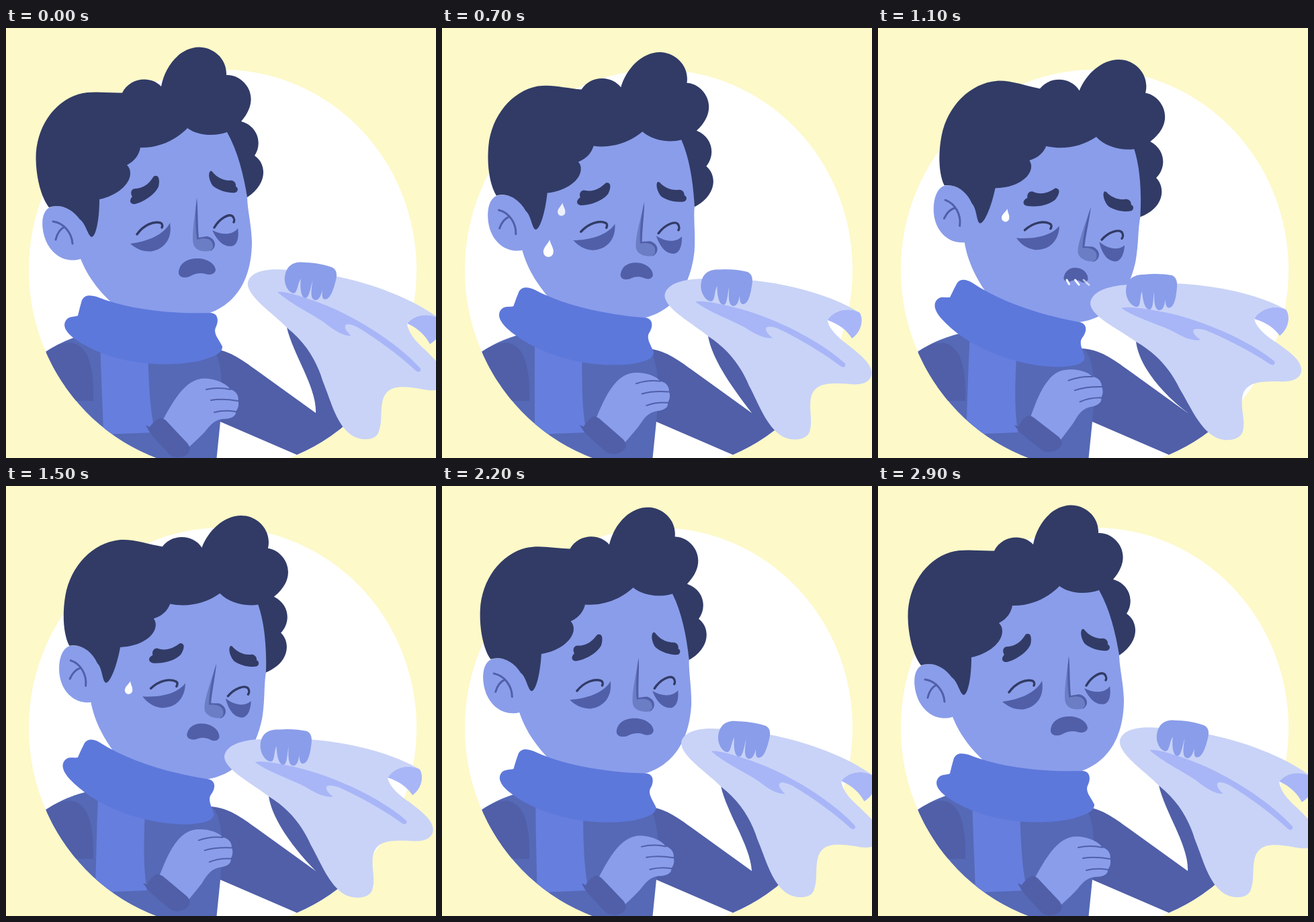
An HTML page that plays this animation: 640 px wide and 640 px high, repeating every 3 s.

```html
<!DOCTYPE html>
<html lang="en">
<head>
<meta charset="utf-8">
<title>Sneeze</title>
<style>
  html, body { margin: 0; width: 100%; height: 100%; overflow: hidden; background: #fdf9c9; }
  svg { display: block; width: 100%; height: 100%; }
  .skin { fill: #8a9dea; }
  .dark { fill: #505fa8; }
  .hair { fill: #313b66; }
  .fold { fill: #a8b6f8; }
  .line { fill: none; stroke: #505fa8; stroke-linecap: round; }
  .lid { fill: none; stroke: #313b66; stroke-width: 3.4; stroke-linecap: round; }
  .white { fill: #fff; }
  #spit path { fill: none; stroke: #fff; stroke-width: 3; stroke-linecap: round; }
</style>
</head>
<body>
<svg viewBox="0 0 640 640">
  <defs>
    <clipPath id="disc"><ellipse cx="322.5" cy="360" rx="288.5" ry="298"/></clipPath>
    <path id="drop" d="M0,-10 C2,-4 6,-1 6,4.5 A6,6 0 0 1 -6,4.5 C-6,-1 -2,-4 0,-10Z"/>
  </defs>
  <ellipse class="white" cx="322.5" cy="360" rx="288.5" ry="298"/>

  <g clip-path="url(#disc)">
    <path class="dark" d="M304,477 C332,479 350,493 375,511 L461,573 L475,560 L530,585 L520,640 L444,640 L319,586Z"/>
    <path class="dark" id="forearm"/>
    <path fill="#5569b6" d="M30,645 L30,502 C68,473 95,460 130,453 L304,477 C322,484 324,535 319,586 L313,645Z"/>
    <path class="dark" d="M30,555 L30,506 L62,481 C72,473 85,467 100,469 C122,476 131,500 130,555Z"/>
    <path id="tail" fill="#667edd" d="M140,450 C141,520 144,560 145,605 L222,602 C215,570 212,540 211,460Z"/>
  </g>

  <g id="head">
    <path class="skin" d="M113,287 C98,265 78,262 65,267 C51,274 52,300 60,318 C70,340 92,351 113,343Z"/>
    <path class="line" stroke-width="3" d="M70,288 C86,290 98,305 99,321 M74,315 C76,306 81,299 87,296"/>
    <path class="skin" d="M110,341 C122,372 140,395 175,425 L280,430 C345,420 366,370 366,318 C365,290 359,270 359,250 C354,215 345,180 328,152 L270,140 L200,150 L139,230 L112,285Z"/>
    <path class="hair" d="M139,255 C168,249 190,228 184,210 Q183,207 180,204 C193,197 198,188 200,178 C225,179 252,168 270,149 C285,160 310,162 329,155 C345,183 354,220 359,252 C390,232 388,202 370,190 C382,172 375,146 350,139 C384,100 351,68 328,70 C329,45 308,28.5 287,28.5 C258,29 236,58 231,87 C215,70 184,74 173,96.5 C150,97 128,93 108,98.5 C70,110 44,150 44.5,195 C45,225 53,253 64,267 C80,261 98,268 110,285 C119,291 122,311 128,311 C134,309 139,285 139,255Z"/>

    <path class="dark" d="M185,321 C210,318 235,308 244,290 C248,312 237,329 216,332.5 C202,333 193,328 185,321Z"/>
    <path class="dark" d="M307,301 C322,309 338,308 345,298 C347,310 345,322 337,324.5 C324,327 314,316 307,301Z"/>
    <path class="lid" d="M195,307 C205,293 220,287 230,290 C233,291 233,295 232,297 M310,297 C318,283 332,276 337,280 C340,283 340,287 339,289"/>
    <path class="hair" id="browL" d="M222,220 C228,219 229,227 227,236 C221,249 204,259 192,262 C184,263 183,256 188,251 C184,245 187,238 194,239 C206,238 214,230 219,222 Q220,220 222,220Z"/>
    <path class="hair" id="browR" d="M304,213 C300,217 303,229 308,235 C318,243 332,246 341,245 C346,244 346,237 342,236 C343,230 338,226 333,227 C322,227 313,221 308,215 Q306,212 304,213Z"/>
    <path fill="#6b7dc4" d="M284,254 C281,280 276,308 279,322 C282,333 298,334 306,331 C312,325 310,314 299,312 L286,313Z"/>
    <path class="dark" d="M284,253 C281,275 282,300 284.5,315 C298,311 309,314 308,327 L304,332 C314,328 314,313 299,310 L287,312 C285,290 286,270 284,253Z"/>
    <path class="dark" id="mouth" d="M257,365 C257,350 270,343 285,343 C300,343 311,351 312,360 C311,367 303,368 297,366 C290,364 282,365 275,369 C268,373 258,372 257,365Z"/>
    <use class="white" href="#drop" id="dropA"/>
    <use class="white" href="#drop" id="dropB"/>
    <path fill="#5d78db" d="M113,405 C117,397 125,397 135,400 C180,418 240,426 305,424 C316,425 317,436 312,446 C308,455 318,465 322,474 C322,486 305,490 290,495 C230,508 150,498 100,461 C86,450 84,440 91,433 C95,429 103,430 107,428 Q110,415 113,405Z"/>
  </g>

  <g id="spit"><path/><path/><path opacity=".6"/></g>

  <g id="chestHand">
    <path class="skin" d="M230,590 C246,560 264,526 290,522 C307,520 328,528 334,538 C342,540 347,547 345.5,555 C347,560 346,566 342,571 C343,579 333,582 322,582 C308,584 302,594 295,602 C288,609 280,617 272,624Z"/>
    <path class="line" stroke-width="2" d="M298,538 Q316,534 334,538 M305,554 Q322,551 345,555 M310,572 Q325,568 342,571"/>
    <path class="dark" d="M226,582 Q231,578 238,584 L270,618 Q276,625 272,632 C266,640 252,641 245,636 C235,626 222,612 214,602 L208,591 L214,594 Q218,587 226,582Z"/>
  </g>

  <g id="hanky">
    <path fill="#c9d3f7" d="M316,410 C317,394 338,384 372,382 L440,380 C500,382 565,396 607,419 C590,411 568,418 560,433 C563,447 580,460 593,468 C612,482 632,495 630,511 C628,524 612,527 597,526 C570,526 546,526 542,550 C540,570 547,582 543,600 C539,615 515,616 502,609 C478,596 465,563 449,537 C436,510 416,485 384,467 C360,449 317,430 316,410Z"/>
    <path class="fold" d="M560,433 C568,418 590,411 607,419 C614,428 612,447 598,458 C590,447 578,438 560,433Z"/>
    <path class="fold" d="M362,417 C372,413 410,419 440,426 C500,441 560,471 590,496 C592,501 588,503 583,500 C560,484 520,463 488,450 C465,443 464,453 480,464 C468,467 452,459 438,451 C420,442 385,432 362,417Z"/>
    <path class="skin" d="M369,392 C369,374 380,367 396,367 C412,365 426,366 437,368 C448,372 445,386 444,395 C442,408 439,416 433,416.5 C427,417 427,402 428,391 C428,404 427,420 419,420 C411,420 411,405 411,392 C409,405 410,419 404,419 C397,419 394,405 393,392 C389,400 392,415 385,415 C376,414 369,402 369,392Z"/>
  </g>
</svg>
<script>
  const LOOP = 3000, STEP = 100;
  const $ = id => document.getElementById(id);
  const rays = [...document.querySelectorAll('#spit path')];

  const clamp = v => Math.max(0, Math.min(1, v));
  const ease = u => (1 - Math.cos(Math.PI * clamp(u))) / 2;
  const mix = (a, b, k) => a.map((v, i) => v + (b[i] - v) * k);
  const place = (el, value) => el.setAttribute('transform', value);
  const turn = (deg, x, y) => `rotate(${deg} ${x} ${y})`;

  // Rises from 0 to 1 at the peak, then falls back to 0.
  const swing = (t, from, peak, to) =>
    t < peak ? ease((t - from) / (peak - from)) : ease((to - t) / (to - peak));

  // Point on a ray that leaves (x, y) at the given angle.
  function along(x, y, deg, dist) {
    const r = deg * Math.PI / 180;
    return [x + dist * Math.cos(r), y + dist * Math.sin(r)];
  }

  function spin([x, y], deg, cx, cy) {
    const angle = Math.atan2(y - cy, x - cx) * 180 / Math.PI;
    return along(cx, cy, angle + deg, Math.hypot(x - cx, y - cy));
  }

  // A sweat drop gathers speed as it slides, fading at both ends of its life.
  function sweat(el, t, birth, life, x, y, size) {
    const u = clamp((t - birth) / life);
    place(el, `translate(${x} ${y + 68 * u ** 1.4}) scale(${size})`);
    el.setAttribute('opacity', clamp(12 * Math.min(u, 1 - u)));
  }

  function spray(t) {
    const n = (t - 1100) / 100;
    $('spit').setAttribute('visibility', n >= 0 && n < 3 ? 'visible' : 'hidden');
    rays.forEach((ray, i) => {
      const x = 281 + 12.5 * i, deg = 61 - 9 * i, from = 15 * n;
      ray.setAttribute('d', `M${along(x, 375, deg, from)} L${along(x, 375, deg, from + 7 + 2 * i + 3 * n)}`);
    });
  }

  function draw(t) {
    const nod = 12.1 * swing(t, 260, 1130, 2750);
    const lift = swing(t, 160, 1080, 2450);
    const gape = 1 - .35 * swing(t, 400, 1130, 1750);
    const open = 9 * (1 - lift);

    place($('head'), turn(nod, 236, 415));
    place($('tail'), `translate(0 415) skewX(${-.35 * nod}) translate(0 -415)`);
    place($('browL'), `translate(${2.5 * lift} ${12.5 * lift}) ` + turn(12 * lift, 206, 241));
    place($('browR'), `translate(${-lift} ${7 * lift}) ` + turn(-17 * lift, 323, 230));
    place($('mouth'), `translate(284 357) scale(${gape} ${(1 + gape) / 2}) translate(-284 -357)`);
    sweat($('dropA'), t, 600, 1400, 163, 275, .95);
    sweat($('dropB'), t, 100, 900, 150, 298, 1.25);

    place($('hanky'), turn(open, 535, 673));
    place($('chestHand'), turn(-9 * lift, 206, 624));
    const edge = spin([384, 467], open, 535, 673), inner = spin([425, 470], open, 535, 673);
    const c1 = mix([427, 485], [388, 500], lift), c2 = mix([463, 536], [418, 540], lift);
    $('forearm').setAttribute('d', `M${edge} C${c1} ${c2} 461,573 L500,600 L${inner}Z`);
    spray(t);
  }

  const start = performance.now();
  function tick() {
    const t = (performance.now() - start) % LOOP;
    draw(Math.floor(t / STEP) * STEP);
    requestAnimationFrame(tick);
  }
  tick();
</script>
</body>
</html>
```
